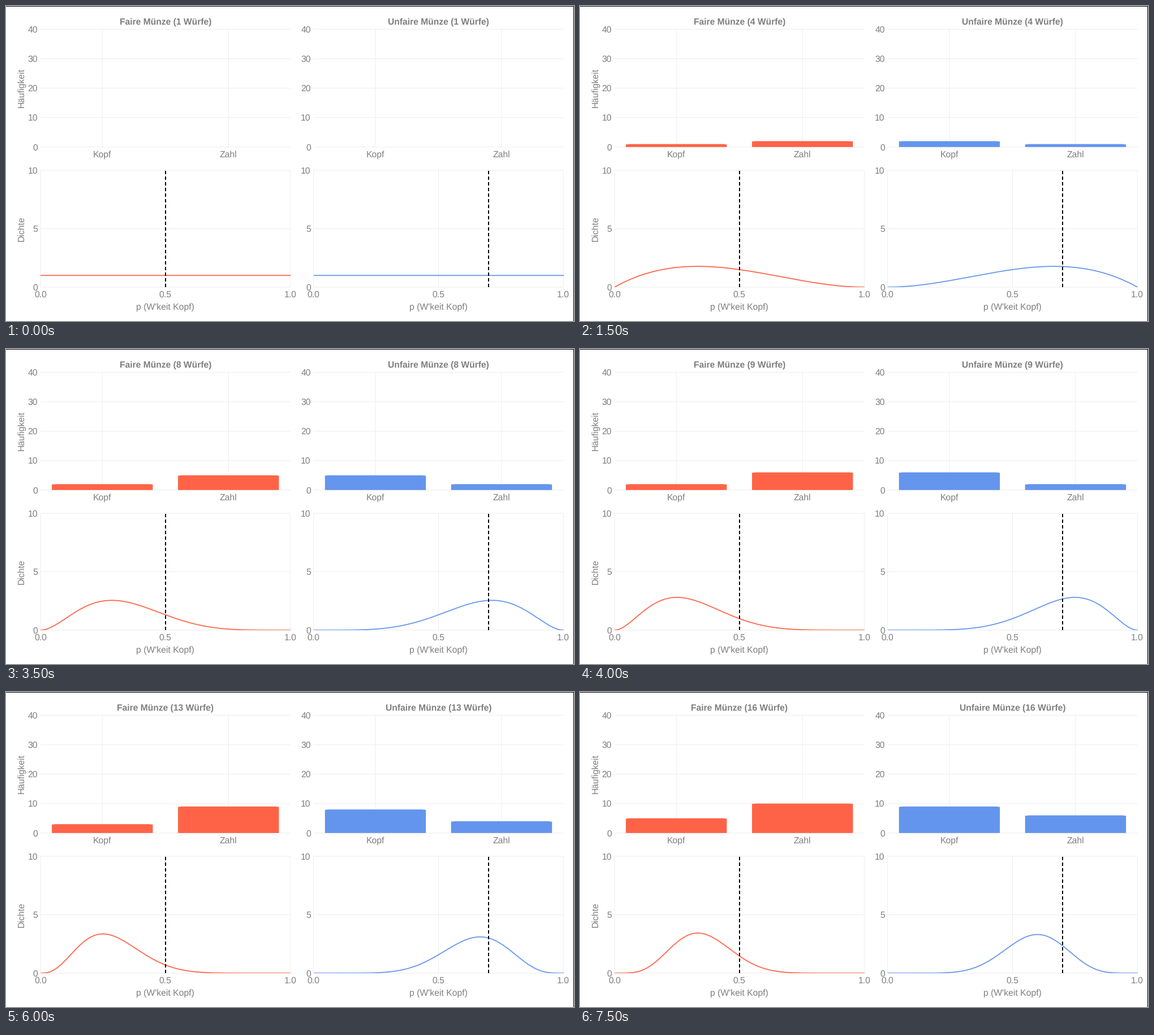
A matplotlib script that plays this animation: 1004x558 px, repeating every 8000 ms.

```python
import math

import matplotlib.pyplot as plt
import numpy as np
from matplotlib.animation import FuncAnimation
from matplotlib.patches import Polygon, Rectangle

W, H, DPI = 1004, 558, 64
PX = 72 / DPI  # one pixel in points
plt.rcParams.update({"font.family": "Liberation Sans", "text.hinting": "none"})

GRAY, GRID = "#7f7f7f", "#ededed"
AX_W = 441.5
BAR_BASE, BAR_TOP, BAR_MAX = 249.8, 41.2, 40
DEN_BASE, DEN_TOP, DEN_MAX = 498, 291, 10
UNIT = AX_W / 1.98  # distance between the two bar centres

# K = Kopf (heads), Z = Zahl (tails)
COINS = [
    dict(name="Faire", x=61.0, p=0.5, color="tomato", tosses="ZKZZZZKZKZZZKZK"),
    dict(name="Unfaire", x=543.7, p=0.7, color="cornflowerblue", tosses="KZKZKKKKZZKKZKZ"),
]
P = np.linspace(0, 1, 400)

fig = plt.figure(figsize=(W / DPI, H / DPI), dpi=DPI, facecolor="white")
ax = fig.add_axes([0, 0, 1, 1])
ax.set_xlim(0, W)
ax.set_ylim(H, 0)
ax.axis("off")


def bar_y(v):
    return BAR_BASE - v * (BAR_BASE - BAR_TOP) / BAR_MAX


def den_y(v):
    return DEN_BASE - v * (DEN_BASE - DEN_TOP) / DEN_MAX


def label(x, y, s, ha="center", size=15.8, **kw):
    return ax.text(x, y, s, ha=ha, va="baseline", color=GRAY, fontsize=size * PX, **kw)


def grid(xs, ys):
    ax.plot(xs, ys, color=GRID, lw=PX, snap=False, solid_capstyle="butt", zorder=1)


def bar_shape(cx, count):
    """Corners of one bar with its slightly softened top."""
    if count == 0:
        return [(cx, BAR_BASE)] * 3
    l, r, top = cx - 0.4 * UNIT, cx + 0.4 * UNIT, bar_y(count)
    return [(l, BAR_BASE), (l, top + 0.7), (l + 7, top),
            (r - 7, top), (r, top + 0.7), (r, BAR_BASE)]


def posterior(heads, tails):
    n = heads + tails
    return (n + 1) * math.comb(n, heads) * P**heads * (1 - P) ** tails


def build_column(coin):
    x0, x1 = coin["x"], coin["x"] + AX_W
    mid = (x0 + x1) / 2
    centers = [x0 + 0.49 * UNIT, x0 + 1.49 * UNIT]

    for v in range(0, 41, 10):
        grid([x0, x1], [bar_y(v)] * 2)
        label(x0 - 5, bar_y(v) + 5.6, str(v), ha="right")
    for cx, s in zip(centers, ("Kopf", "Zahl")):
        grid([cx, cx], [BAR_TOP, BAR_BASE])
        label(cx, 267.6, s)
    for v in (0, 5, 10):
        grid([x0, x1], [den_y(v)] * 2)
        label(x0 - 5, den_y(v) + 5.6, str(v), ha="right")
    for v in (0, 0.5, 1):
        x = x0 + v * AX_W
        grid([x, x], [DEN_TOP, DEN_BASE])
        label(x, 516, f"{v:.1f}")
    label(mid, 538, "p (W'keit Kopf)")

    title = label(mid, 33, "", size=15.65, weight="bold")
    bars = [ax.add_patch(Polygon(bar_shape(cx, 0), fc=coin["color"], lw=0, zorder=2))
            for cx in centers]
    clip = Rectangle((x0, DEN_TOP), AX_W + 0.5, DEN_BASE - DEN_TOP,
                     transform=ax.transData)
    curve, = ax.plot(x0 + P * AX_W, den_y(np.ones_like(P)), color=coin["color"],
                     lw=1.75 * PX, snap=False, zorder=3)
    curve.set_clip_path(clip)
    px = x0 + coin["p"] * AX_W
    ax.plot([px, px], [DEN_BASE, DEN_TOP], color="black", lw=2 * PX, zorder=4,
            dashes=(3, 2), dash_capstyle="butt")
    return title, bars, centers, curve


columns = [build_column(c) for c in COINS]
for y, s in ((145.2, "Häufigkeit"), (394.4, "Dichte")):
    label(31.5, y, s, rotation=90, rotation_mode="anchor")

# thin dark edge along the top and the right side
ax.add_patch(Rectangle((0, 0), W, 1, fc="black", lw=0, zorder=5))
ax.add_patch(Rectangle((W - 1, 0), 1, H, fc="black", lw=0, zorder=5))


def update(i):
    for coin, (title, bars, centers, curve) in zip(COINS, columns):
        seen = coin["tosses"][:i]
        counts = seen.count("K"), seen.count("Z")
        title.set_text(f"{coin['name']} Münze ({i + 1} Würfe)")
        for bar, cx, n in zip(bars, centers, counts):
            bar.set_xy(bar_shape(cx, n))
        curve.set_ydata(den_y(posterior(*counts)))
    return []


anim = FuncAnimation(fig, update, frames=16, interval=500, repeat=True,
                     init_func=lambda: update(0))
plt.show()
```
